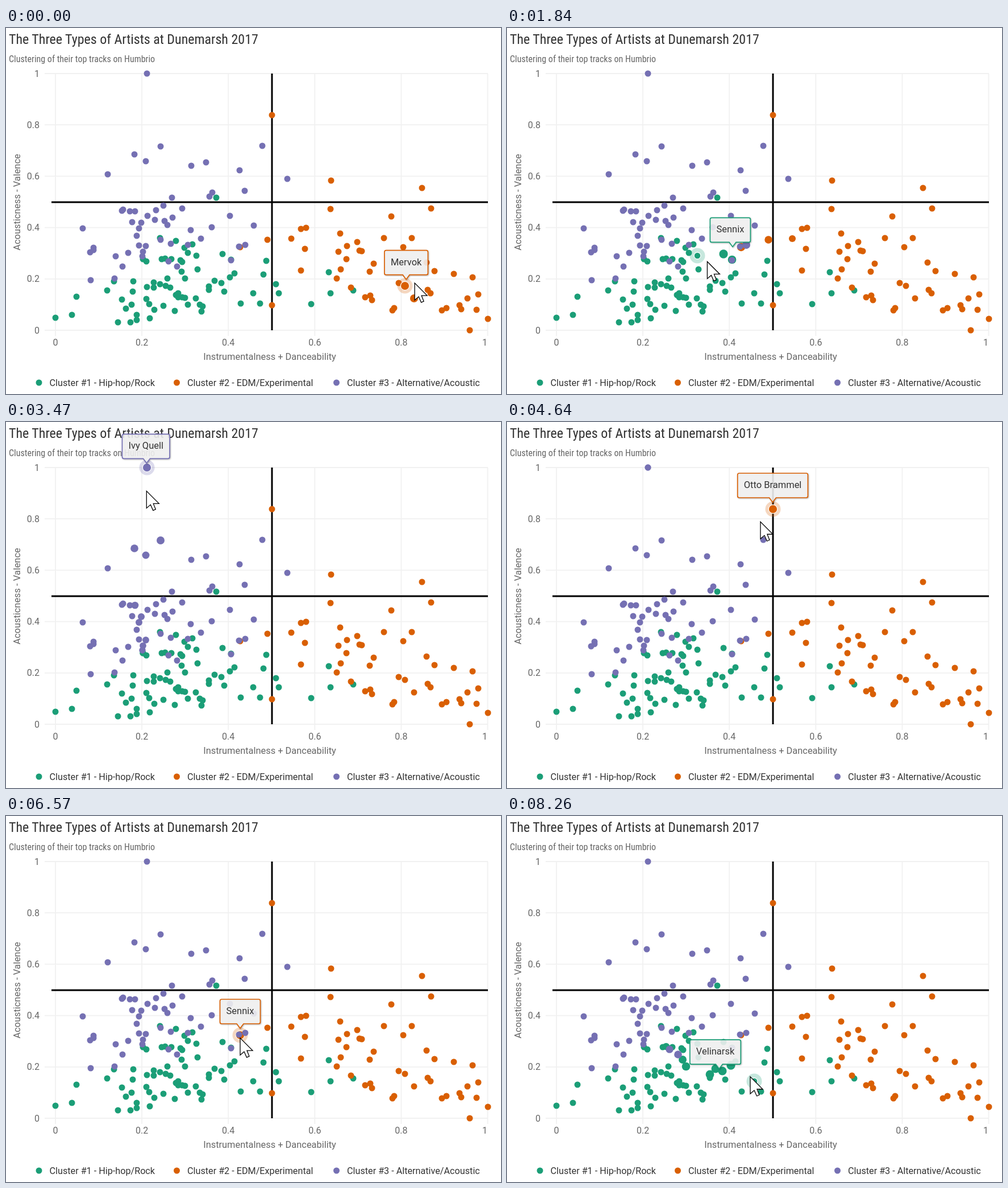
An HTML page that plays this animation: 871 by 643 pixels, repeating every 8330 ms.

```html
<!DOCTYPE html>
<html lang="en">
<head>
<meta charset="utf-8">
<title>Artist clusters</title>
<style>
  html, body { margin: 0; width: 100%; height: 100%; overflow: hidden; background: #fff; }
  svg { display: block; }
  text { font: 16px Roboto, sans-serif; fill: #666; }
  .head { font: 24px "Roboto Condensed", Roboto, sans-serif; fill: #333; }
  .sub { font: 16px "Roboto Condensed", Roboto, sans-serif; }
  .wide .head, .wide .sub { letter-spacing: -.046em; }
  .axis { font-size: 16.4px; text-anchor: middle; }
  .legend { font-size: 16.2px; fill: #333; }
  #label { font-size: 16.5px; fill: #333; }
  #grid { stroke: #f1f1f1; stroke-width: 1.8; }
  #box { fill: #f7f7f7; fill-opacity: .87; stroke-width: 1.7; filter: drop-shadow(1px 1px 1px rgba(0,0,0,.3)); }
  #halo { fill-opacity: .25; }
</style>
</head>
<body>
<svg id="stage" width="871" height="643" viewBox="0 0 871 643">
  <text class="head" x="5" y="28">The Three Types of Artists at Dunemarsh 2017</text>
  <text class="sub" x="5" y="60">Clustering of their top tracks on Humbrio</text>
  <g id="grid"></g>
  <g id="ticks"></g>
  <text class="axis" x="464" y="583">Instrumentalness + Danceability</text>
  <text class="axis" transform="translate(25 306) rotate(-90)">Acousticness - Valence</text>
  <path d="M468 80V531M80 306H848" stroke="#000" stroke-width="3"/>
  <circle id="halo" r="13.5"/>
  <g id="dots"></g>
  <g id="legend"></g>
  <g id="tip"><path id="box"/><text id="label"></text></g>
  <path id="cursor" d="M0 0V30L7 24L11.5 34L16 32L12 22H22Z" fill="#fff" stroke="#000" stroke-width="1.3"/>
</svg>
<script>
const LOOP = 8330, STEP = 16, START = -512, FADE = 500, R = 5.5;
const $ = id => document.getElementById(id);

function add(parent, tag, attrs, text) {
  const el = document.createElementNS('http://www.w3.org/2000/svg', tag);
  for (const k in attrs) el.setAttribute(k, attrs[k]);
  if (text) el.textContent = text;
  return parent.appendChild(el);
}

// x, y pairs for each cluster
const hiphop = [
  370,298, 271,369, 299,374, 314,386, 328,380, 320,395, 335,400, 381,397, 241,406, 247,410,
  274,406, 280,405, 291,406, 307,408, 310,411, 309,428, 337,424, 315,440, 396,407, 402,431,
  394,438, 458,409, 453,433, 367,444, 379,448, 384,463, 357,454, 357,460, 284,440, 260,447,
  260,456, 271,450, 281,453, 289,456, 224,445, 190,445, 178,461, 223,463, 248,455, 204,477,
  247,476, 252,485, 221,486, 211,493, 261,495, 277,488, 297,497, 299,469, 303,466, 303,473,
  310,473, 315,474, 320,486, 334,475, 341,486, 346,489, 344,498, 253,510, 230,504, 230,513,
  219,517, 197,517, 124,472, 116,504, 87,509, 435,466, 413,484, 447,484, 475,450, 480,466,
  537,485, 568,429, 571,466, 611,461];
const edm = [
  468,153, 572,268, 732,281, 571,318, 748,317, 678,331, 588,361, 519,353, 528,351, 460,372,
  502,370, 618,376, 526,388, 600,383, 585,393, 622,391, 626,392, 665,369, 714,369, 699,385,
  599,406, 647,414, 740,412, 754,427, 519,426, 589,424, 640,428, 582,440, 607,456, 788,432,
  821,438, 691,448, 702,453, 742,460, 747,466, 718,475, 641,470, 644,478, 632,473, 683,492,
  680,496, 767,496, 775,492, 798,487, 801,494, 812,475, 831,468, 828,495, 848,511, 816,531,
  468,487, 412,385];
const acoustic = [
  248,80, 272,208, 226,222, 246,234, 179,257, 326,242, 352,236, 411,250, 451,207, 495,265,
  420,286, 363,289, 358,296, 292,298, 277,312, 310,317, 204,321, 206,319, 218,322, 227,322,
  264,320, 249,330, 262,337, 293,333, 394,330, 222,341, 238,342, 279,339, 284,346, 234,352,
  325,355, 362,350, 436,347, 135,352, 230,365, 343,370, 272,372, 290,379, 320,381, 234,382,
  246,383, 154,386, 154,390, 148,394, 215,395, 241,393, 193,401, 240,401, 205,419, 286,410,
  301,419, 396,408, 410,384, 421,381, 191,440, 149,443];

const clusters = [
  { name: 'Cluster #1 - Hip-hop/Rock', color: '#1b9e77', data: hiphop, x: 58 },
  { name: 'Cluster #2 - EDM/Experimental', color: '#d95f02', data: edm, x: 300.5 },
  { name: 'Cluster #3 - Alternative/Acoustic', color: '#7570b3', data: acoustic, x: 581.5 }
];

const names = {
  '702,453': 'Mervok', '528,351': 'Tovrin', '246,234': 'Wombra', '468,153': 'Otto Brammel',
  '421,381': 'Gentle Otters', '307,408': 'Corvin Blate', '435,466': 'Velinarsk',
  '588,361': 'Marlow Fen', '460,372': 'Pondrel', '248,80': 'Ivy Quell',
  '495,265': 'Hollow Tamber', '410,384': 'Sandy Crell', '742,460': 'Night Parlours',
  '665,369': 'Copper Velgate', '326,242': 'Tessa Morrin', '226,222': 'Plain Orrel'
};
const spare = ['Jorvan', 'Mildew Hall', 'Kestin', 'Ora Pellwick', 'Drumlo', 'The Quarlies', 'Sennix'];

// cursor: time, x, y
const path = [
  [-500,722,482], [0,719,448], [150,735,460], [400,705,425], [600,668,383], [920,606,366],
  [1150,570,368], [1230,553,366], [1690,425,393], [1950,300,423], [2080,240,405], [2150,234,380],
  [2220,236,345], [2340,276,310], [2410,275,262], [2530,277,239], [2720,318,250], [2900,265,340],
  [3020,245,408], [3200,225,240], [3320,242,140], [3390,246,125], [3770,252,108], [3940,252,108],
  [4170,358,100], [4410,450,138], [4560,450,138], [4640,446,175], [4800,440,215], [5000,418,262],
  [5340,505,295], [5420,518,345], [5470,488,366], [5600,445,372], [5640,424,371], [5800,422,384],
  [6260,412,386], [6720,412,392], [7100,412,392], [7400,345,397], [7460,326,398], [7520,318,398],
  [7560,305,399], [7870,276,397], [8060,300,425], [8165,330,448], [8224,385,444], [8260,428,458]];

function cursorAt(t) {
  const i = path.findIndex(k => k[0] > t);
  if (i < 1) return (i ? path[path.length - 1] : path[0]).slice(1);
  const [a, b] = [path[i - 1], path[i]], f = (t - a[0]) / (b[0] - a[0]);
  return [a[1] + (b[1] - a[1]) * f, a[2] + (b[2] - a[2]) * f];
}

function drawChart() {
  for (let i = 0; i <= 5; i++) {
    const x = 87 + i * 152.1, y = 531 - i * 90.2, value = String(i / 5);
    add($('grid'), 'path', { d: `M${x} 80V541M68 ${y}H848` });
    add($('ticks'), 'text', { x: 59, y: y + 5.5, 'text-anchor': 'end' }, value);
    add($('ticks'), 'text', { x: i < 5 ? x : 847, y: 558, 'text-anchor': i < 5 ? 'middle' : 'end' }, value);
  }
  for (const c of clusters) {
    add($('legend'), 'circle', { cx: c.x, cy: 623, r: R, fill: c.color });
    add($('legend'), 'text', { x: c.x + 18.5, y: 629, class: 'legend' }, c.name);
  }
}

function makePoints() {
  const points = [];
  for (const { data, color } of clusters) {
    for (let i = 0; i < data.length; i += 2) {
      const [x, y] = [data[i], data[i + 1]];
      const name = names[`${x},${y}`] || spare[points.length % spare.length];
      const dot = add($('dots'), 'circle', { cx: x, cy: y, r: R, fill: color, stroke: '#fff', 'stroke-width': 0 });
      points.push({ x, y, color, name, dot });
    }
  }
  return points;
}

function nearest([x, y]) {
  let best, min = Infinity;
  for (const p of points) {
    const d = (p.x - x) ** 2 + (p.y - y) ** 2;
    if (d < min) { min = d; best = p; }
  }
  return best;
}

function labelWidth(p) {
  if (!p.width) {
    $('label').textContent = p.name;
    p.width = $('label').getComputedTextLength() + 22;
  }
  return p.width;
}

// the tooltip chases the hovered point in steps of two ticks
function simulate() {
  const log = [];
  let tip;
  for (let i = 0; START + i * STEP <= LOOP; i++) {
    const p = nearest(cursorAt(START + i * STEP));
    const goal = { left: p.x - labelWidth(p) / 2, top: p.y - 63, tail: p.x };
    if (!tip) tip = goal;
    else if (i % 2 === 0) tip = {
      left: (2 * tip.left + goal.left) / 3,
      top: (tip.top + goal.top) / 2,
      tail: (2 * tip.tail + goal.tail) / 3
    };
    log.push({ p, ...tip });
  }
  return log;
}

function drawTip({ p, left, top, tail }) {
  const w = p.width, right = left + w, base = top + 43;
  const x = Math.max(left + 9, Math.min(right - 9, tail));
  $('box').setAttribute('d', `M${left + 3} ${top}H${right - 3}q3 0 3 3V${base - 3}q0 3 -3 3H${x + 6}` +
    `L${x} ${base + 8}L${x - 6} ${base}H${left + 3}q-3 0 -3 -3V${top + 3}q0 -3 3 -3Z`);
  $('box').setAttribute('stroke', p.color);
  $('label').setAttribute('x', left + 11);
  $('label').setAttribute('y', top + 26);
  $('label').textContent = p.name;
}

function drawDots(n) {
  const hot = log[n].p, age = new Map();
  for (let k = 0; k * STEP < FADE && k <= n; k++) {
    const p = log[n - k].p;
    if (!age.has(p)) age.set(p, k * STEP);
  }
  let run = 0;
  while (run < 7 && run < n && log[n - run].p === hot) run++;
  for (const p of points) {
    let grow = age.has(p) ? 1 - age.get(p) / FADE : 0;
    if (p === hot) grow = Math.min(1, run * STEP / 100);
    p.dot.setAttribute('r', R + 2.2 * grow);
    p.dot.setAttribute('stroke-width', p === hot ? 1.2 : 0);
  }
  $('halo').setAttribute('cx', hot.x);
  $('halo').setAttribute('cy', hot.y);
  $('halo').setAttribute('fill', hot.color);
}

function render() {
  const t = performance.now() % LOOP;
  const n = Math.floor((t - START) / STEP);
  drawDots(n);
  drawTip(log[n]);
  $('cursor').setAttribute('transform', `translate(${cursorAt(t)})`);
  requestAnimationFrame(render);
}

// tighten the headings when no condensed face is installed
const pen = document.createElement('canvas').getContext('2d');
const measure = font => (pen.font = font, pen.measureText('Types of Artists').width);
if (measure('24px "Roboto Condensed", monospace') === measure('24px monospace')) $('stage').classList.add('wide');

drawChart();
const points = makePoints();
const log = simulate();
render();
</script>
</body>
</html>
```
